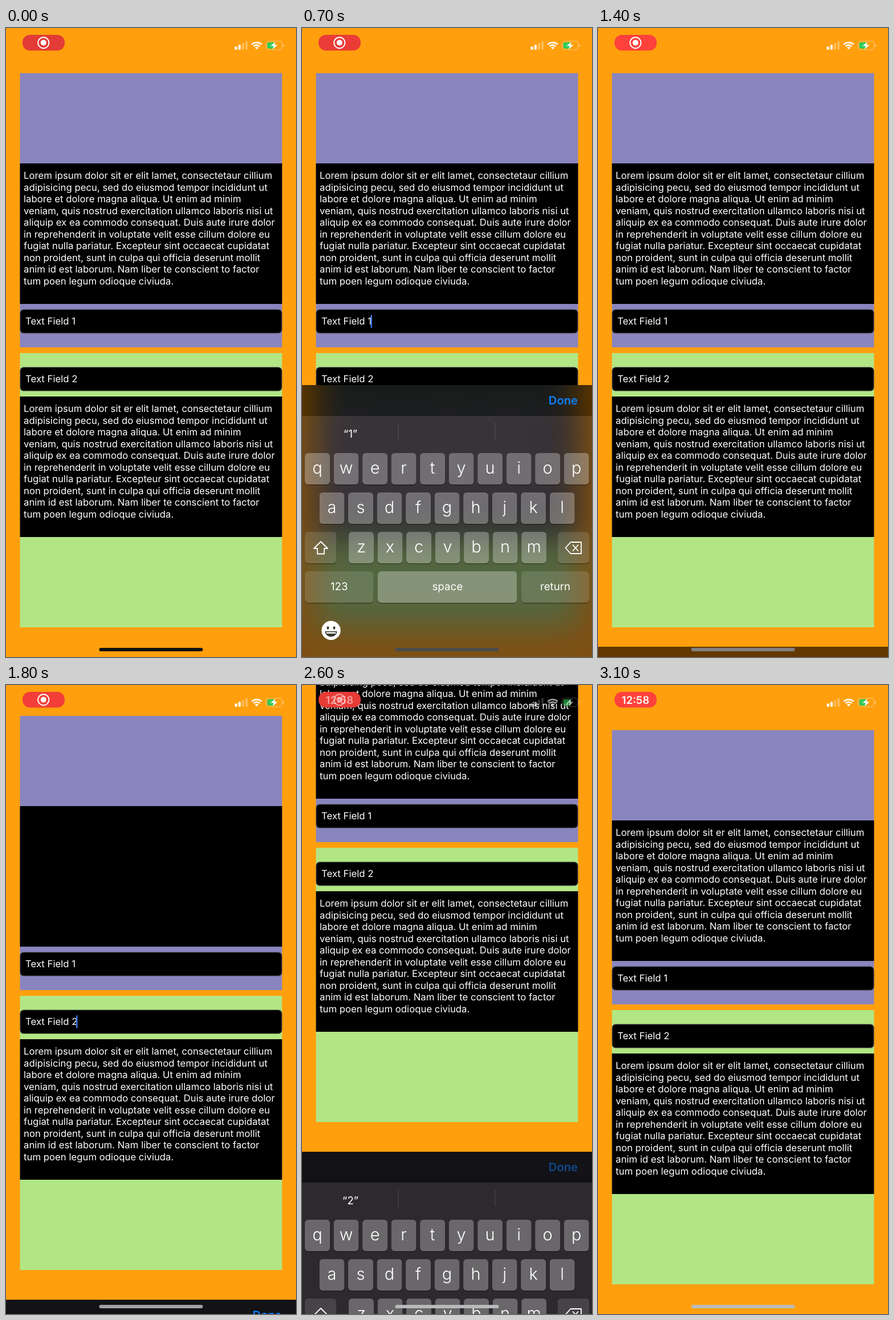
An HTML page with a canvas for the animation above (3200 ms loop, 509 by 1101 pixels).

```html
<!DOCTYPE html>
<html lang="en">
<head>
<meta charset="utf-8">
<title>Keyboard and text fields</title>
<style>
html, body { margin: 0; width: 100%; height: 100%; overflow: hidden; background: #000; }
canvas { display: block; width: 509px; height: 1101px; }
</style>
</head>
<body>
<canvas id="stage" width="509" height="1101"></canvas>
<script>
const W = 509, H = 1101, LOOP = 3200, STEP = 100;
const KEYS_H = 479.5, BAR_H = 54, PAD = 70, BODY = 16.75;
const FONT = 'Inter, "Liberation Sans", sans-serif';
const LOREM = [
  'Lorem ipsum dolor sit er elit lamet, consectetaur cillium',
  'adipisicing pecu, sed do eiusmod tempor incididunt ut',
  'labore et dolore magna aliqua. Ut enim ad minim',
  'veniam, quis nostrud exercitation ullamco laboris nisi ut',
  'aliquip ex ea commodo consequat. Duis aute irure dolor',
  'in reprehenderit in voluptate velit esse cillum dolore eu',
  'fugiat nulla pariatur. Excepteur sint occaecat cupidatat',
  'non proident, sunt in culpa qui officia deserunt mollit',
  'anim id est laborum. Nam liber te conscient to factor',
  'tum poen legum odioque civiuda.'
];

// Moments when the keyboard starts to rise or fall
const SHOW1 = 322.5, HIDE1 = 1120, SHOW2 = 1780, HIDE2 = 2523.5;

const stage = document.getElementById('stage');
const ctx = stage.getContext('2d');
ctx.textRendering = 'geometricPrecision';

function makeLayer(w, h) {
  const c = document.createElement('canvas');
  c.width = w;
  c.height = h;
  return c.getContext('2d');
}
const padded = makeLayer(W + 2 * PAD, H + 2 * PAD);
const glass = makeLayer(W, H);

function rect(x, y, w, h, color) {
  ctx.fillStyle = color;
  ctx.fillRect(x, y, w, h);
}

function round(x, y, w, h, r, fill, stroke) {
  ctx.beginPath();
  ctx.roundRect(x, y, w, h, r);
  if (fill) { ctx.fillStyle = fill; ctx.fill(); }
  if (stroke) { ctx.strokeStyle = stroke; ctx.stroke(); }
}

function circle(x, y, r, color) {
  ctx.beginPath();
  ctx.arc(x, y, r, 0, Math.PI * 2);
  ctx.fillStyle = color;
  ctx.fill();
}

function label(text, x, y, size, { weight = 400, align = 'left', color = '#fff' } = {}) {
  ctx.font = `${weight} ${size}px ${FONT}`;
  ctx.textAlign = align;
  ctx.fillStyle = color;
  ctx.fillText(text, x, y);
}

function polyline(points, close) {
  ctx.beginPath();
  points.forEach(([x, y]) => ctx.lineTo(x, y));
  if (close) ctx.closePath();
  ctx.stroke();
}

function withAlpha(alpha, draw) {
  ctx.save();
  ctx.globalAlpha *= alpha;
  draw();
  ctx.restore();
}

// Critically damped spring, 0 to 1
function spring(ms) {
  if (ms <= 0) return 0;
  const x = 0.01826 * ms;
  return 1 - (1 + x) * Math.exp(-x);
}

// Linear interpolation through [time, value] pairs
function track(t, keys) {
  for (let i = 1; i < keys.length; i++) {
    const [t0, a] = keys[i - 1], [t1, b] = keys[i];
    if (t <= t1) return a + (b - a) * Math.max(0, (t - t0) / (t1 - t0));
  }
  return keys[keys.length - 1][1];
}

function lorem(y) {
  LOREM.forEach((line, i) => label(line, 31, y + i * 20.52, BODY));
}

function field(n, y, caret) {
  ctx.lineWidth = 1.2;
  round(25, y, 459, 41, 6, '#000', '#3c3c40');
  label('Text Field ' + n, 34, y + 26.3, BODY);
  if (caret) round(n === 1 ? 120.5 : 123, y + 9, 2.5, 23, 1.2, '#3f74e8');
}

function drawPage(t, scroll) {
  rect(0, 0, W, H, '#000');
  ctx.save();
  ctx.translate(0, -scroll);
  rect(0, 0, W, H, '#ff9f0d');
  rect(24.5, 79, 460, 480, '#8a85be');
  rect(24.5, 237, 460, 246, '#000');
  if (t < SHOW2 || t > HIDE2) lorem(264);
  field(1, 493, t >= SHOW1 && t < 1000);
  rect(24.5, 569, 460, 480, '#b2e684');
  rect(24.5, 645, 460, 246, '#000');
  lorem(672);
  field(2, 594, t >= SHOW2 && t < 2450);
  ctx.restore();
}

// Blurred, darkened copy of what lies below the keyboard
function drawGlass(top) {
  const h = H - top, right = W + PAD, bottom = h + PAD, tall = bottom + PAD;
  padded.drawImage(stage, 0, top, W, h, PAD, PAD, W, h);
  padded.drawImage(stage, 0, top, W, 1, PAD, 0, W, PAD);
  padded.drawImage(stage, 0, H - 1, W, 1, PAD, bottom, W, PAD);
  padded.drawImage(padded.canvas, PAD, 0, 1, tall, 0, 0, PAD, tall);
  padded.drawImage(padded.canvas, right - 1, 0, 1, tall, right, 0, PAD, tall);

  glass.clearRect(0, 0, W, H);
  glass.filter = 'blur(28px)';
  glass.drawImage(padded.canvas, 0, 0, W + 2 * PAD, tall, -PAD, -PAD, W + 2 * PAD, tall);
  glass.filter = 'none';
  glass.fillStyle = 'rgba(25,24,29,.75)';
  glass.fillRect(0, 0, W, BAR_H);
  glass.fillStyle = 'rgba(59,57,61,.75)';
  glass.fillRect(0, BAR_H, W, H);
}

function pasteGlass(h) {
  ctx.filter = 'saturate(1.8)';
  ctx.drawImage(glass.canvas, 0, 0, W, h, 0, 0, W, h);
  ctx.filter = 'none';
}

// The face is cut back to the glass so that the shadow stays outside it
function glassKey(x, y, w, dark, h) {
  round(x, y + 1.5, w, 55, 6, 'rgba(0,0,0,.35)');
  ctx.save();
  ctx.beginPath();
  ctx.roundRect(x, y, w, 55, 6);
  ctx.clip();
  pasteGlass(h);
  rect(x, y, w, 55, dark ? 'rgba(255,255,255,.125)' : 'rgba(255,255,255,.29)');
  ctx.restore();
}

function letters(row, x, y, h) {
  [...row].forEach((ch, i) => {
    const kx = x + i * 50.52;
    glassKey(kx, y, 44, false, h);
    label(ch, kx + 22, y + 35.5, 29, { weight: 300, align: 'center' });
  });
}

function wordKey(word, x, y, w, dark, h) {
  glassKey(x, y, w, dark, h);
  label(word, x + w / 2, y + 33, 18.7, { align: 'center' });
}

function drawShift(x, y) {
  polyline([[x, y - 11], [x + 12, y + 1], [x + 6, y + 1], [x + 6, y + 10.5],
    [x - 6, y + 10.5], [x - 6, y + 1], [x - 12, y + 1]], true);
}

function drawDelete(x, y) {
  polyline([[x - 14, y], [x - 5, y - 10], [x + 13.5, y - 10], [x + 13.5, y + 10], [x - 5, y + 10]], true);
  polyline([[x - 1, y - 5], [x + 8, y + 5]]);
  polyline([[x + 8, y - 5], [x - 1, y + 5]]);
}

function drawSmiley(x, y) {
  const ink = '#39372f';
  circle(x, y, 16.7, '#fff');
  for (const side of [-5.5, 5.5]) {
    ctx.beginPath();
    ctx.ellipse(x + side, y - 4.5, 2, 2.7, 0, 0, Math.PI * 2);
    ctx.fillStyle = ink;
    ctx.fill();
  }
  ctx.beginPath();
  ctx.ellipse(x, y + 1.5, 10.5, 9.5, 0, 0, Math.PI);
  ctx.fill();
  round(x - 8.5, y + 3, 17, 2.6, 1.2, '#fff');
}

function drawKeyboard(t, h) {
  const second = t >= SHOW2, top = H - h;
  drawGlass(top);
  ctx.save();
  ctx.translate(0, top);
  pasteGlass(h);

  const pressed = (t >= 1050 && t < 1700) || t >= 2450;
  withAlpha(pressed ? 0.5 : 1, () =>
    label('Done', 484, 34, 20.2, { weight: 600, align: 'right', color: '#0a80ff' }));

  const fade = Math.min(1, (t - (second ? SHOW2 : SHOW1)) / 260);
  withAlpha(Math.max(0, fade), () =>
    label(second ? '“2”' : '“1”', 85, 92, 19, { align: 'center' }));
  for (const x of [168.5, 338]) rect(x, 66, 1, 30, 'rgba(255,255,255,.16)');

  letters('qwertyuiop', 5, 119, h);
  letters('asdfghjkl', 30.5, 188, h);
  letters('zxcvbnm', 82, 257, h);
  glassKey(5, 257, 55.5, true, h);
  glassKey(448.5, 257, 55.5, true, h);
  wordKey('123', 5, 326, 120.5, true, h);
  wordKey('space', 133, 326, 244.5, false, h);
  wordKey('return', 385, 326, 119, true, h);

  ctx.strokeStyle = '#fff';
  ctx.lineWidth = 1.8;
  ctx.lineJoin = ctx.lineCap = 'round';
  drawShift(33, 285);
  drawDelete(476.5, 285);
  drawSmiley(51, 429.5);
  ctx.restore();
}

function drawSignal() {
  [5.5, 8.5, 12, 15].forEach((h, i) =>
    round(401.5 + i * 6.2, 38 - h, 4.2, h, 1, i < 2 ? '#fff' : 'rgba(255,255,255,.3)'));
}

function drawWifi() {
  const x = 440, y = 37.5, from = -Math.PI * 0.75, to = -Math.PI * 0.25;
  ctx.strokeStyle = ctx.fillStyle = '#fff';
  ctx.lineCap = 'butt';
  for (const [r, w] of [[12.2, 2.8], [7.6, 2.7]]) {
    ctx.lineWidth = w;
    ctx.beginPath();
    ctx.arc(x, y, r, from, to);
    ctx.stroke();
  }
  ctx.beginPath();
  ctx.moveTo(x, y);
  ctx.arc(x, y, 4.4, from, to);
  ctx.fill();
}

function drawBattery() {
  ctx.lineWidth = 1.2;
  round(456.5, 23, 28, 15, 4.5, null, 'rgba(255,255,255,.42)');
  round(486, 28, 1.8, 5, 1, 'rgba(255,255,255,.42)');
  round(458.5, 25, 13.5, 11, 2.5, '#35cb5b');
  ctx.fillStyle = '#fff';
  ctx.beginPath();
  [[473, 23.8], [464.5, 31.6], [469.8, 31.6], [467.8, 37.4], [476.5, 29.4], [471.2, 29.4]]
    .forEach(([x, y]) => ctx.lineTo(x, y));
  ctx.fill();
}

function drawStatus(t) {
  const glow = track(t, [[0, 0.2], [400, 0], [1100, 1], [1400, 0.95], [1800, 0.62], [2100, 0.12], [2400, 0], [2600, 0.3], [3100, 1]]);
  round(29, 12, 74, 27.5, 13, `rgb(${220 + 35 * glow},${57 + 8 * glow},${52 + 7 * glow})`);

  const clock = track(t, [[2500, 0], [2600, 0.5], [2700, 1]]);
  withAlpha(1 - clock, () => {
    ctx.strokeStyle = '#fff';
    ctx.lineWidth = 2;
    ctx.beginPath();
    ctx.arc(65.8, 25.8, 9.6, 0, Math.PI * 2);
    ctx.stroke();
    circle(65.8, 25.8, 5, '#fff');
  });
  withAlpha(clock, () =>
    label('12:58', 65.8, 32.8, 18.5, { weight: 600, align: 'center' }));

  withAlpha(track(t, [[2500, 1], [2600, 0.6], [2800, 1]]), () => {
    drawSignal();
    drawWifi();
    drawBattery();
  });
}

function drawHomeBar(t) {
  const v = track(t, [[0, 18], [300, 20], [500, 62], [1100, 102], [1800, 162], [2100, 182], [3100, 187]]);
  round(163.5, 1085, 182, 6, 3, `rgb(${v},${v},${v})`);
}

function render(t) {
  const first = KEYS_H * (spring(t - SHOW1) - spring(t - HIDE1));
  const scroll = Math.round(KEYS_H * (spring(t - SHOW2) - spring(t - HIDE2)));
  const shown = t < SHOW2 ? Math.round(first) : scroll;
  drawPage(t, scroll);
  if (shown > 0) drawKeyboard(t, shown);
  drawStatus(t);
  drawHomeBar(t);
}

const start = performance.now();
function tick() {
  const t = (performance.now() - start) % LOOP;
  render(Math.floor(t / STEP) * STEP);
  requestAnimationFrame(tick);
}
tick();
</script>
</body>
</html>
```
